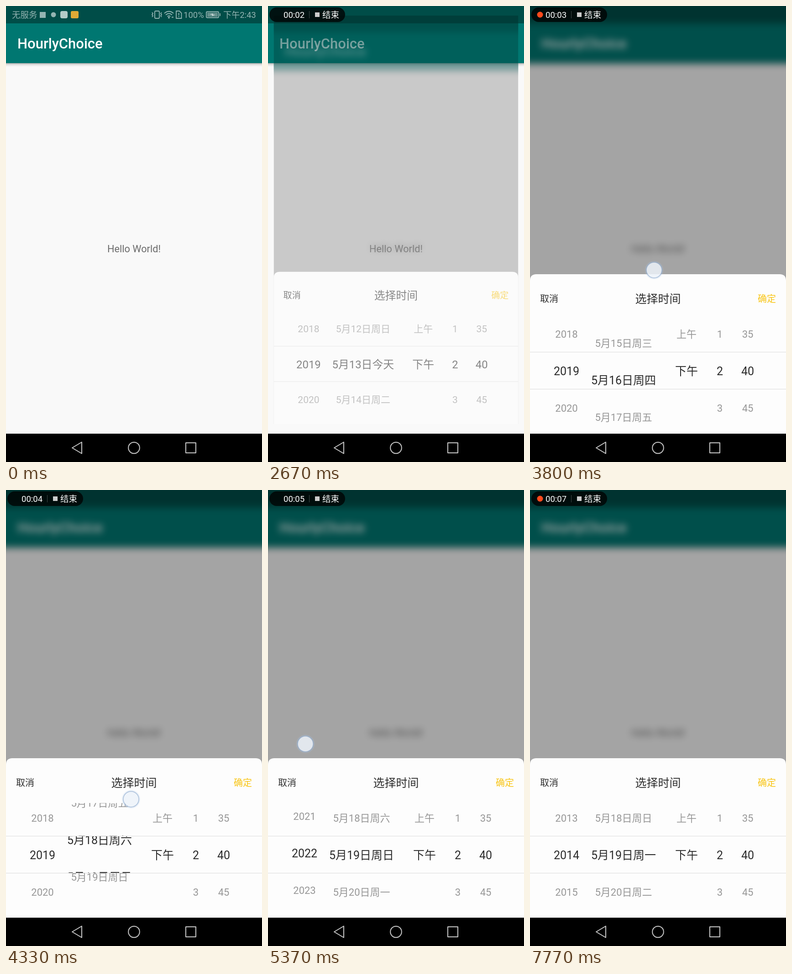
An HTML page for the animation above (8 s loop, 561 by 998 pixels).

```html
<!DOCTYPE html>
<html lang="zh-CN">
<head>
<meta charset="utf-8">
<title>Date wheel</title>
<style>
  html, body { margin: 0; width: 100%; height: 100%; overflow: hidden; background: #fafafa; }
  svg { display: block; width: 100%; height: 100%; font-family: Roboto, "Noto Sans CJK SC", "Noto Sans CJK", sans-serif; }
</style>
</head>
<body>
<svg viewBox="0 0 561 998">
  <defs>
    <filter id="blur" filterUnits="userSpaceOnUse" x="-60" y="-60" width="681" height="1120" color-interpolation-filters="sRGB">
      <feGaussianBlur stdDeviation="8"/>
    </filter>
    <linearGradient id="shade" x1="0" y1="0" x2="0" y2="1">
      <stop offset="0" stop-opacity=".32"/>
      <stop offset=".4" stop-opacity=".1"/>
      <stop offset="1" stop-opacity="0"/>
    </linearGradient>
    <radialGradient id="glow">
      <stop offset=".78" stop-color="#a9c4e4" stop-opacity=".55"/>
      <stop offset="1" stop-color="#a9c4e4" stop-opacity="0"/>
    </radialGradient>
    <clipPath id="window"><rect width="561" height="936"/></clipPath>
    <clipPath id="band"><rect y="758" width="561" height="80"/></clipPath>
    <clipPath id="outer"><path d="M0 685h561v72.5H0zM0 838.5h561V912H0z"/></clipPath>
  </defs>

  <g id="page">
    <rect x="-60" y="-60" width="681" height="1120" fill="#f9f9f9"/>
    <rect x="-60" y="125" width="681" height="8" fill="url(#shade)"/>
    <rect x="-60" y="-60" width="681" height="185" fill="#007771"/>
    <rect x="-60" y="-60" width="681" height="98" fill="#004d48"/>
    <text x="25" y="93" font-size="31" font-weight="500" fill="#fff">HourlyChoice</text>
    <text x="280.5" y="539" font-size="21.7" fill="#6c6c6c" text-anchor="middle">Hello World!</text>
  </g>

  <g id="notices" fill="#94b4b2">
    <text x="13" y="26" font-size="18.5">无服务</text>
    <rect x="74" y="13" width="13" height="13"/>
    <circle cx="104" cy="19" r="5.5"/>
    <rect x="119" y="11" width="16" height="16" rx="4" fill="#b3cbc7"/>
    <rect x="142" y="11" width="17" height="16" rx="3" fill="#dfaa36"/>
  </g>
  <g id="status" fill="none" stroke="#94b4b2" stroke-width="1.8">
    <rect x="326" y="11" width="10" height="16" rx="2"/>
    <path d="M320 14l2 2.5-2 2.5 2 2.5-2 2.5M341 14l-2 2.5 2 2.5-2 2.5 2 2.5"/>
    <path d="M347 16q10-8.500 20 0M350 19.500q7-6 14 0M353.500 23q3.500-3 7 0"/>
    <circle cx="357" cy="25.500" r="1"/>
    <path d="M363 24.500h4M373 11h7l4.500 4.500V27H373zM378.700 15v5.500M378.700 22v2"/>
    <rect x="439" y="12.500" width="27" height="13" rx="2"/>
    <path d="M469 16v6"/>
    <rect x="441" y="14.500" width="23" height="9" fill="#648f8c" stroke="none"/>
    <path d="M446 18.500l8-2-1 2.500 6 0-8 3 1-3z" fill="#d5e2e1" stroke="none"/>
    <g fill="#94b4b2" stroke="none">
      <text x="389" y="26" font-size="18.500">100%</text>
      <text x="476" y="26" font-size="18.300">下午2:43</text>
    </g>
  </g>

  <g id="dialog">
    <g clip-path="url(#window)">
      <use href="#page" filter="url(#blur)"/>
      <rect width="561" height="936" fill-opacity=".34"/>
      <path d="M0 936V601q0-14 14-14H547q14 0 14 14V936z" fill="#fdfdfd"/>
      <path d="M0 757.5H561M0 838.5H561" stroke="#dcdcdc"/>
      <g fill="#2e2e2e">
        <text x="22" y="648" font-size="20">取消</text>
        <text x="280.5" y="650" font-size="25" text-anchor="middle">选择时间</text>
        <text x="499" y="648" font-size="20" fill="#f8c412">确定</text>
      </g>
      <g id="sideRows" clip-path="url(#outer)" font-size="22" fill="#979797" text-anchor="middle"></g>
      <g id="midRows" clip-path="url(#band)" font-size="25" fill="#2b2b2b" text-anchor="middle"></g>
    </g>
  </g>

  <rect y="936" width="561" height="62"/>
  <g fill="none" stroke="#c6c6c6" stroke-width="2" stroke-linejoin="round">
    <path d="M145 967L166 954.5V979.5z"/>
    <circle cx="280.500" cy="967" r="12.300"/>
    <rect x="394" y="956" width="22" height="22"/>
  </g>

  <g id="pill">
    <rect x="3" y="3" width="166" height="32" rx="16" fill-opacity=".76"/>
    <circle id="dot" cx="22" cy="19" r="6.500" fill="#ff4a1c"/>
    <text id="clock" x="34" y="26" font-size="18.500" fill="#fff"></text>
    <path d="M90.500 11V27" stroke="#fff" stroke-opacity=".25"/>
    <rect x="103" y="14" width="10" height="10" fill="#ccc"/>
    <text x="119" y="26" font-size="18.500" fill="#fff">结束</text>
  </g>

  <g id="touch">
    <circle r="21" fill="url(#glow)"/>
    <circle r="17" fill="#fff" fill-opacity=".68" stroke="#7d9cc4" stroke-opacity=".55" stroke-width="1.500"/>
  </g>
</svg>

<script>
const LOOP = 8000, FRAME = 100 / 3, ROW = 81, MIDDLE = 799;
const $ = id => document.getElementById(id);
const clamp = x => Math.min(1, Math.max(0, x));
const linear = x => x;
const easeIn = x => x ** 1.5;
const easeOut = power => x => 1 - (1 - x) ** power;

// Each key is [time, value, easing into this key].
function track(t, keys) {
  if (t <= keys[0][0]) return keys[0][1];
  for (let i = 1; i < keys.length; i++) {
    const [t0, v0] = keys[i - 1], [t1, v1, ease = linear] = keys[i];
    if (t < t1) return v0 + (v1 - v0) * ease((t - t0) / (t1 - t0));
  }
  return keys[keys.length - 1][1];
}

const dayKeys = [
  [3570, 13], [3600, 13.05], [3800, 15.75], [3870, 16.45], [4130, 17, easeOut(2)],
  [4190, 17], [4333, 18.41], [4400, 18.85], [4730, 19, easeOut(2)]
];
const yearKeys = [
  [5030, 2019], [5366, 2022.04], [5430, 2022.45], [5810, 2023, easeOut(3)],
  [6730, 2023], [6900, 2020.2, easeIn], [7740, 2014, easeOut(5)]
];

const touches = [
  { from: 1800, to: 2120, x: 298, y: [[0, 532]] },
  { from: 3530, to: 3900, x: 272, y: [[3570, 809], [3600, 801], [3800, 578], [3870, 522]] },
  { from: 4150, to: 4440, x: 274, y: [[4190, 791], [4333, 677], [4400, 641]] },
  { from: 4970, to: 5470, x: 82, y: [[5030, 802], [5366, 556], [5430, 523]] },
  { from: 6690, to: 6940, x: 84, y: [[6730, 655], [6900, 882, easeIn]] }
];

const shownYear = t => t < 5860 ? 2019 : t < 7760 ? 2023 : 2014;
const weekday = (year, day) => '日一二三四五六'[new Date(year, 4, day).getDay()];
function dayLabel(day, t) {
  const year = shownYear(t);
  return `5月${day}日` + (year === 2019 && day === 13 ? '今天' : '周' + weekday(year, day));
}

const columns = [
  { x: 80, at: t => track(t, yearKeys), label: i => i },
  { x: 205, at: t => track(t, dayKeys), label: dayLabel },
  { x: 343, at: () => 1, label: i => ['上午', '下午'][i] || '' },
  { x: 416, at: () => 2, label: i => i },
  { x: 477, at: () => 8, label: i => i * 5 }
];

function addRow(layer, x) {
  const node = document.createElementNS('http://www.w3.org/2000/svg', 'text');
  node.setAttribute('x', x);
  return $(layer).appendChild(node);
}
for (const column of columns)
  column.rows = [-2, -1, 0, 1, 2].map(offset => ({
    offset, side: addRow('sideRows', column.x), mid: addRow('midRows', column.x)
  }));

function drawWheels(t) {
  for (const { at, label, rows } of columns) {
    const value = at(t);
    for (const { offset, side, mid } of rows) {
      const index = Math.round(value) + offset;
      const y = MIDDLE + (index - value) * ROW;
      side.textContent = mid.textContent = label(index, t);
      side.setAttribute('y', y + 8);
      mid.setAttribute('y', y + 9);
    }
  }
}

function drawDialog(t) {
  const open = t >= 2660;
  $('dialog').style.display = open ? '' : 'none';
  if (!open) return;
  const p = easeOut(2)(clamp((t - 2612) / 165));
  const scale = 0.9 + 0.1 * p;
  $('dialog').setAttribute('opacity', p);
  $('dialog').setAttribute('transform', `translate(280.5 468) scale(${scale}) translate(-280.5 -468)`);
  drawWheels(t);
}

function drawRecorder(t) {
  const shown = clamp((t - 67) / 230);
  const phase = t % 1000;
  const dotOn = phase < 130 || phase >= (t > 2000 && t < 3000 ? 690 : 630 + (t > 1000 ? 30 : 0));
  $('pill').setAttribute('opacity', shown);
  $('notices').setAttribute('opacity', 1 - shown);
  $('dot').style.display = dotOn ? '' : 'none';
  $('clock').textContent = '00:0' + Math.max(0, Math.floor((t - 160) / 1000));
  $('status').style.display = t < 2460 ? '' : 'none';
}

function drawTouch(t) {
  const touch = touches.find(({ from, to }) => t >= from && t < to);
  $('touch').style.display = touch ? '' : 'none';
  if (!touch) return;
  const { from, to, x, y } = touch;
  $('touch').setAttribute('opacity', Math.min(clamp((t - from + 30) / 60), clamp((to - t) / 60)));
  $('touch').setAttribute('transform', `translate(${x} ${track(t, y)})`);
}

function draw(now) {
  const t = Math.floor((now % LOOP + 4) / FRAME) * FRAME;
  drawDialog(t);
  drawRecorder(t);
  drawTouch(t);
  requestAnimationFrame(draw);
}

draw(0);
</script>
</body>
</html>
```
